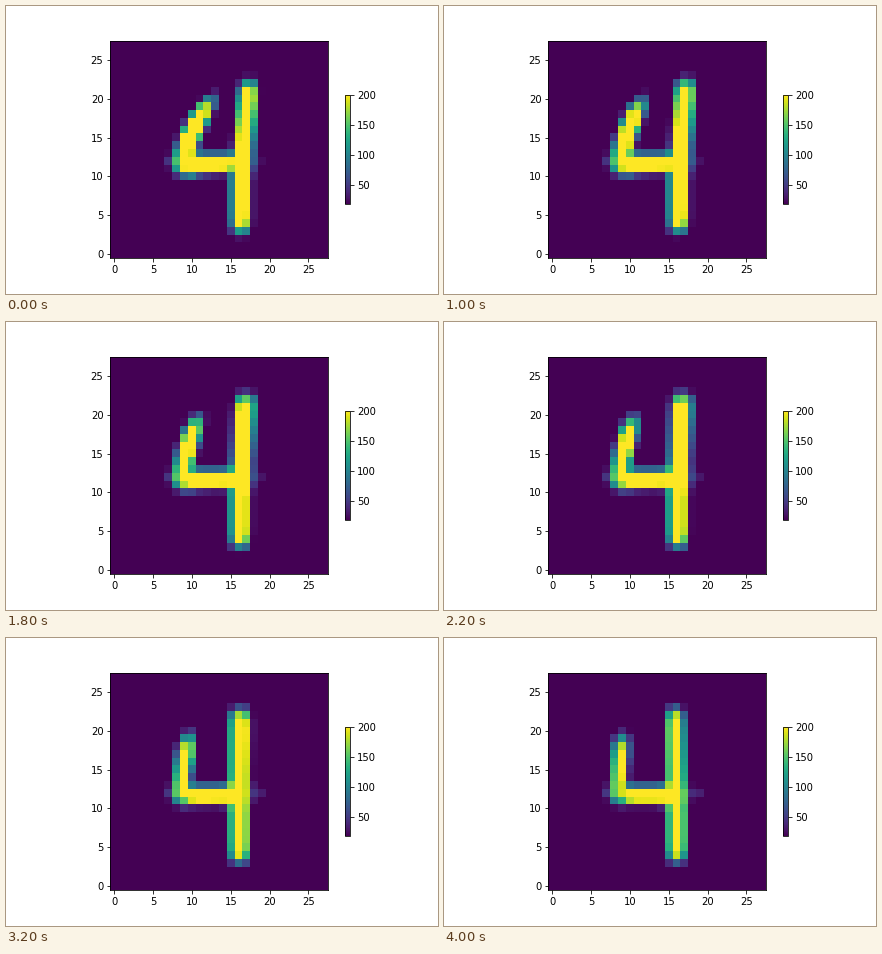
Recreate the animation shown at these times as a matplotlib script. Size 432 px wide and 288 px high, loop 4200 ms.

```python
import numpy as np
import matplotlib.pyplot as plt
from matplotlib.animation import FuncAnimation

SIZE, FRAMES, INTERVAL = 28, 21, 200
X, Y = np.meshgrid(np.arange(SIZE), np.arange(SIZE))


def soft(d, width=0.3):
    """Blurred step: 0 outside an edge, 1 inside."""
    return 1 / (1 + np.exp(-d / width))


def between(pos, low, high, width=0.3):
    return soft(pos - low, width) * soft(high - pos, width)


def lerp(a, b, t):
    return a + (b - a) * t


def stem(t):
    """Upright stroke; its upper part leans right at first, then straightens."""
    rise = np.maximum(Y - 9, 0) / 13
    ease = t * t * (3 - 2 * t)
    left = lerp(15.15 + 1.1 * rise, 14.95 - 0.1 * rise, ease)
    right = lerp(17.4 + rise, 17.1 - 0.25 * rise, t ** 2)
    return between(X, left, right) * between(Y, lerp(3.0, 3.4, t), lerp(22.0, 22.6, t), 0.5)


def hook(t):
    """Curved left arm; it swings upright and gets shorter."""
    left = lerp(7.9, 7.85, t) + lerp(0.043, 0.004, t) * np.maximum(Y - 11, 0) ** 2
    right = lerp(10.2, 9.3, t) + lerp(0.44, 0.1, t) * np.maximum(Y - 13, 0)
    ends = soft(lerp(19.8, 18.9, t) - Y, 0.7) * soft(Y - lerp(10.5, 10.9, t), 0.5)
    return between(X, left, right) * ends


def bar(t):
    """Crossbar; its underside tilts at first, then levels out."""
    bottom = lerp(10.3 + 0.08 * (X - 10), 10.65, t)
    return between(Y, bottom, 12.75) * between(X, 9.3, lerp(15.4, 16.5, t))


def glow(x, strength):
    return strength * np.exp(-(X - x) ** 2 / 2 - (Y - 12) ** 2 / 1.3)


def digit(t):
    parts = [stem(t), hook(t), bar(t), glow(7.2, 0.15), glow(18.6, lerp(0.1, 0.15, t))]
    return 255 * (1 - np.prod([1 - part for part in parts], axis=0))


plt.rcParams.update({"font.family": "DejaVu Sans", "font.size": 10})
fig, ax = plt.subplots(figsize=(6, 4), dpi=72)
fig.subplots_adjust(left=0.125, right=0.9, bottom=0.1251, top=0.8801)
image = ax.imshow(digit(0), origin="lower", cmap="viridis", vmin=20, vmax=200,
                  interpolation="nearest")
ax.set_xticks(range(0, SIZE, 5))
ax.set_yticks(range(0, SIZE, 5))
fig.colorbar(image, ax=ax, shrink=0.5, use_gridspec=False, ticks=[50, 100, 150, 200])


def update(frame):
    image.set_data(digit(frame / (FRAMES - 1)))
    return [image]


animation = FuncAnimation(fig, update, frames=FRAMES, interval=INTERVAL,
                          repeat=True, repeat_delay=0)
plt.show()
```
